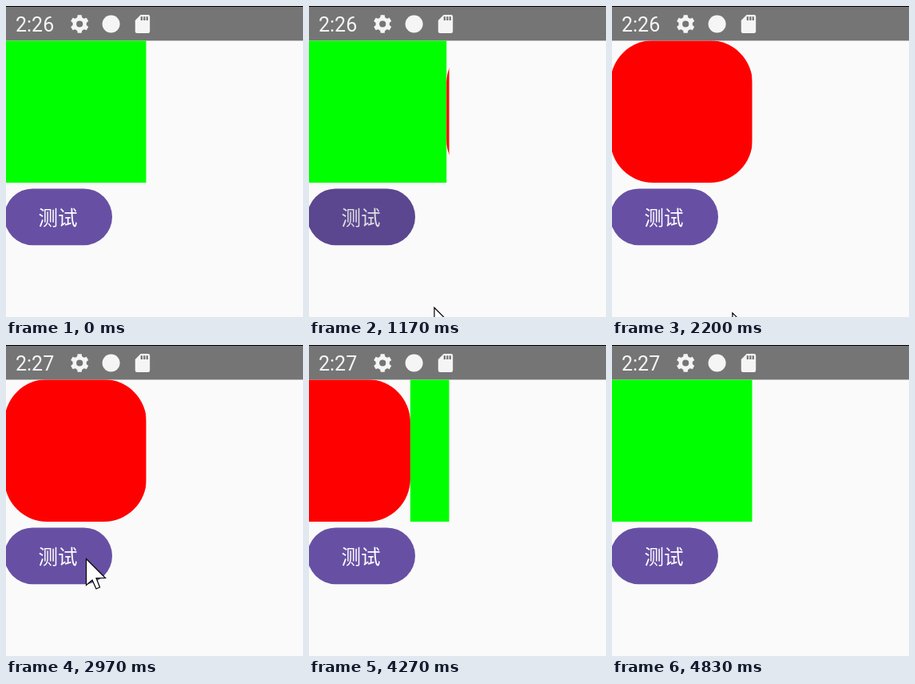
These frames come from a looping animation (372 px wide and 389 px high, 5.93 s). An HTML page:

```html
<!DOCTYPE html>
<html lang="zh-CN">
<head>
<meta charset="utf-8">
<style>
  html, body { margin: 0; height: 100%; overflow: hidden; background: #fafafa; }
  svg { display: block; }
  .clock { font: 25px Roboto, sans-serif; }
  .label { font: 24.5px "Noto Sans CJK SC", "Noto Sans CJK", sans-serif; }
</style>
</head>
<body>
<svg width="372" height="389" viewBox="0 0 372 389">
  <defs>
    <clipPath id="frame"><rect x="-2" y="43.4" width="177.5" height="177.6"/></clipPath>
    <path id="tooth" d="M-3.2 -7L-2.5 -11.3H2.5L3.2 -7Z"/>
    <rect id="pill" x="-2" y="228.4" width="135" height="70.8" rx="35.4"/>
  </defs>

  <rect width="372" height="43.4" fill="#757575"/>
  <rect width="372" height="1" fill="#000"/>
  <g fill="#f5f5f5">
    <text id="clock" class="clock" x="12" y="32">2:26</text>
    <g transform="translate(92.2 22.5)">
      <circle r="6.4" fill="none" stroke="#f5f5f5" stroke-width="4.6"/>
      <g id="gear"></g>
    </g>
    <circle cx="131.6" cy="22.5" r="11"/>
    <path transform="translate(157.2 8.7) scale(1.15)" fill-rule="evenodd"
      d="M18 2h-8L4 8V20a2 2 0 0 0 2 2h12a2 2 0 0 0 2-2V4a2 2 0 0 0-2-2z
         M12 8h-2V4h2z M15 8h-2V4h2z M18 8h-2V4h2z"/>
  </g>

  <g clip-path="url(#frame)">
    <rect id="green" x="-2" y="43" width="178" height="178" fill="#0f0"/>
    <rect id="red" x="-2" y="43" width="178" height="178" rx="53.4" fill="#f00"/>
  </g>

  <use href="#pill" fill="#6750a4"/>
  <text class="label" x="65" y="273.5" text-anchor="middle" fill="#fff">测试</text>
  <use id="press" href="#pill" fill="#000" opacity="0"/>

  <path id="cursor" d="M0 0V33L7.5 26.5L12.5 37.5L17 35.5L12.5 24H24Z"
    fill="#fff" stroke="#000" stroke-width="1.2"/>
</svg>
<script>
const $ = id => document.getElementById(id);
const LOOP = 5930, SIZE = 178;
const clamp = v => Math.min(1, Math.max(0, v));
const mix = (a, b, k) => a + (b - a) * k;
const easeOut = k => 1 - (1 - clamp(k)) ** 2;

for (let a = 0; a < 360; a += 60)
  $('gear').innerHTML += `<use href="#tooth" transform="rotate(${a})"/>`;

// Cubic bezier (0.4, 0, 0.2, 1), solved by bisection
function standardEase(x) {
  if (x <= 0 || x >= 1) return clamp(x);
  let lo = 0, hi = 1, s;
  for (let i = 0; i < 24; i++) {
    s = (lo + hi) / 2;
    const u = 1 - s;
    if (1.2 * s * u * u + 0.6 * s * s * u + s * s * s < x) lo = s; else hi = s;
  }
  return s * s * (3 - 2 * s);
}

// The pointer glides up to the button, rests, clicks and drops out of view
const BELOW = 391, ENTER_X = 154, EXIT_X = 166, EXIT_TIME = 170;
const visits = [
  { enter: 400, arrive: 850, leave: 1060, x: 91, y: 277 },
  { enter: 2180, arrive: 2900, leave: 4000, x: 100.5, y: 267.5 }
];

function pointer(t) {
  const { enter, arrive, leave, x, y } = visits[t < visits[1].enter ? 0 : 1];
  const away = t > leave;
  const k = away ? 1 - easeOut((t - leave) / EXIT_TIME)
                 : easeOut((t - enter) / (arrive - enter));
  return [mix(away ? EXIT_X : ENTER_X, x, k), mix(BELOW, y, k)];
}

const pressed = t => 0.12 * clamp(t / 60) * clamp((330 - t) / 150);
const shift = (id, x, y = 0) => $(id).setAttribute('transform', `translate(${x} ${y})`);

function draw(now) {
  const t = now % LOOP;
  const there = standardEase((t - 1084) / 954);
  const back = t >= 4830 ? 1 : standardEase((t - 4028) / 914);
  const returning = back > 0;
  shift('green', SIZE * (returning ? 1 - back : -there));
  shift('red', SIZE * (returning ? -back : 1 - there));
  shift('cursor', ...pointer(t));
  $('press').setAttribute('opacity', pressed(t - 1040) + pressed(t - 3940));
  $('clock').textContent = t < 2480 ? '2:26' : '2:27';
  requestAnimationFrame(() => draw(performance.now() - start));
}

const start = performance.now();
draw(0);
</script>
</body>
</html>
```
